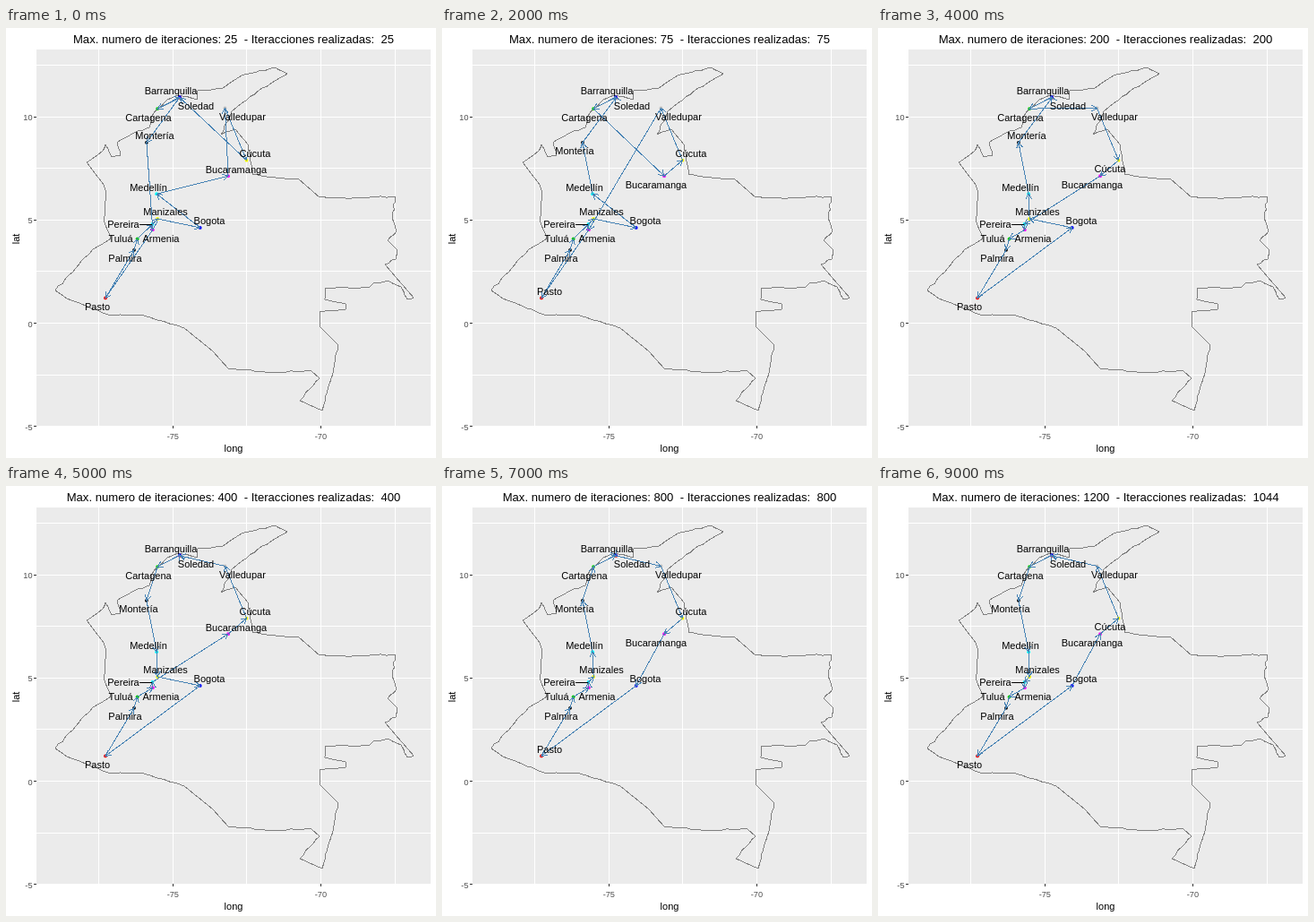
An HTML page for the animation above (10000 ms loop, 480 px wide and 480 px high).

```html
<!DOCTYPE html>
<html lang="es">
<head>
<meta charset="utf-8">
<title>Ruta</title>
<style>
html, body { margin: 0; width: 100%; height: 100%; overflow: hidden; background: #fff; }
svg { display: block; width: 100vw; height: 100vh; }
text { font: 11px "Liberation Sans", Arial, sans-serif; text-anchor: middle; white-space: pre; }
.axis text { font-size: 9.2px; fill: #4d4d4d; }
.crisp { shape-rendering: crispEdges; fill: none; }
#title { font-size: 13.1px; }
</style>
</head>
<body>
<svg id="stage" viewBox="0 0 480 480">
  <rect width="480" height="480" fill="#fff"/>
  <rect x="34" y="24" width="440" height="420" fill="#ebebeb"/>
  <path id="grid" class="crisp" stroke="#fff"/>
  <path id="ticks" class="crisp" stroke="#333"/>
  <path id="land" class="crisp" stroke="#7f7f7f"/>
  <g id="axis" class="axis"></g>
  <text x="254" y="473">long</text>
  <text transform="translate(15 235.5) rotate(-90)">lat</text>
  <g id="dots"></g>
  <path id="route" class="crisp" stroke="#4682b4"/>
  <path class="crisp" stroke="#000" d="M149 219.5H163"/>
  <g id="names"></g>
  <text id="title" x="254" y="17"></text>
</svg>
<script>
const $ = id => document.getElementById(id);
const px = lon => 186.3 + (lon + 75) * 33.03;
const py = lat => 329.5 - lat * 23.02;

function add(parent, tag, attrs, text = '') {
  const el = document.createElementNS('http://www.w3.org/2000/svg', tag);
  for (const k in attrs) el.setAttribute(k, attrs[k]);
  el.textContent = text;
  return parent.appendChild(el);
}

function drawAxes() {
  let grid = '', ticks = '';
  for (let lat = -5; lat <= 12.5; lat += 2.5) grid += `M34 ${py(lat)}H474`;
  for (let lon = -77.5; lon <= -67.5; lon += 2.5) grid += `M${px(lon)} 24V444`;
  for (let lat = -5; lat <= 10; lat += 5) {
    ticks += `M31 ${py(lat)}H34`;
    add($('axis'), 'text', { x: 29.5, y: py(lat) + 4, style: 'text-anchor:end' }, lat);
  }
  for (let lon = -75; lon <= -70; lon += 5) {
    ticks += `M${px(lon)} 444V447`;
    add($('axis'), 'text', { x: px(lon), y: 459 }, lon);
  }
  $('grid').setAttribute('d', grid);
  $('ticks').setAttribute('d', ticks);
}

// Key points of the outline, clockwise from the south-west corner
const outline = `55,293 78,268 87,257 97,247 117,235 109,214 111,200 112,184 109,175 90,150
  107,138 111,130 118,144 128,142 124,128 147,115 160,111 163,98 180,80 194,75 213,80 214,70
  241,68 263,53 300,44 314,51 286,67 252,93 240,119 256,113 270,130 276,164 327,169 350,189
  386,190 435,188 431,212 436,227 426,237 437,248 435,258 423,264 455,301 448,303 441,289
  426,282 410,285 405,290 357,290 356,303 379,308 379,314 350,317 350,333 371,354 363,391
  353,427 328,416 350,391 341,383 295,384 248,380 231,361 199,335 151,320 117,321 68,302`;

// Joins the key points with short, slightly rough steps
function drawLand() {
  let seed = 7;
  const random = () => (seed = seed * 16807 % 2147483647) / 2147483647;
  const points = outline.split(/\s+/).map(p => p.split(',').map(Number));
  const path = points.flatMap(([x1, y1], i) => {
    const [x2, y2] = points[(i + 1) % points.length];
    const count = Math.ceil(Math.hypot(x2 - x1, y2 - y1) / 6);
    return Array.from({ length: count }, (_, n) => {
      const rough = n ? 1.6 * (random() - .5) : 0;
      return `${x1 + (x2 - x1) * n / count + rough} ${y1 + (y2 - y1) * n / count + rough}`;
    });
  });
  $('land').setAttribute('d', `M${path.join('L')}Z`);
}

// key: name, longitude, latitude, label offset in px, label row (-1 above, 1 below)
const cities = {
  L: ['Palmira', -76.31, 3.55, -10, 1],
  O: ['Pasto', -77.28, 1.22, -9, 1],
  T: ['Tuluá', -76.2, 4.09, -18.5, -.12],
  K: ['Bogota', -74.08, 4.63, 10, -1],
  D: ['Medellín', -75.55, 6.27, -9, -1],
  G: ['Bucaramanga', -73.13, 7.14, 9, -1],
  U: ['Cúcuta', -72.51, 7.9, 9.5, -1],
  V: ['Valledupar', -73.24, 10.43, 20, 1],
  M: ['Montería', -75.89, 8.76, 9, -1],
  S: ['Soledad', -74.76, 10.93, 18, 1],
  C: ['Cartagena', -75.52, 10.4, -10, 1],
  B: ['Barranquilla', -74.77, 10.96, -9.5, -1],
  P: ['Pereira', -75.69, 4.8, -33, -.12],
  A: ['Armenia', -75.68, 4.53, 9, 1],
  Z: ['Manizales', -75.52, 5.06, 9, -1]
};
const palette = ['#000', '#f00', '#00cd00', '#00f', '#0ff', '#f0f', '#ff0', '#bebebe'];

const places = {};
Object.entries(cities).forEach(([key, [name, lon, lat, dx, row]], i) => {
  const x = px(lon), y = py(lat);
  add($('dots'), 'circle', { cx: x, cy: y, r: 1.9, fill: palette[i % palette.length] });
  places[key] = { x, y, dx, row, label: add($('names'), 'text', {}, name) };
});

// limit, iterations done, closed tour, labels flipped to the opposite corner
const steps = [
  [25, 25, 'ZKDGVUSCBMAOLTP', ''],
  [50, 50, 'ZKDMSBCGUVAOLTP', 'G'],
  [75, 75, 'ZKDMSBCGUVAOLTP', 'MGO'],
  [100, 100, 'OKZDMSBCGUVPATL', 'O'],
  [200, 200, 'OKZDMSBCVUGPATL', 'GU'],
  [400, 400, 'OLTAPGUVSBCMDZK', 'M'],
  [600, 600, 'OLTAPZDMCBSVUGK', 'MG'],
  [800, 800, 'OLTAPZDMCBSVUGK', 'MGO'],
  [1000, 1000, 'OKGUVSBCMDZPATL', 'MGU'],
  [1200, 1044, 'OKGUVSBCMDZPATL', 'MGU']
];

function arrow(from, to) {
  const dir = Math.atan2(from.y - to.y, from.x - to.x);
  const barb = turn => `${to.x + 7 * Math.cos(dir + turn)} ${to.y + 7 * Math.sin(dir + turn)}`;
  const tip = `${to.x} ${to.y}`;
  return `M${from.x} ${from.y}L${tip}M${barb(.52)}L${tip}L${barb(-.52)}`;
}

function draw(i) {
  const [limit, done, tour, flipped] = steps[i];
  $('title').textContent =
    `Max. numero de iteraciones: ${limit}  - Iteracciones realizadas:  ${done}`;
  $('route').setAttribute('d',
    [...tour].map((k, n) => arrow(places[k], places[tour[(n + 1) % tour.length]])).join(''));
  for (const key in places) {
    const { x, y, dx, row, label } = places[key];
    const side = flipped.includes(key) ? -1 : 1;
    label.setAttribute('x', Math.round(x + side * dx));
    label.setAttribute('y', Math.round(y + 5 + side * row * 8.6));
  }
}

drawAxes();
drawLand();
const start = performance.now();
let shown = -1;
function tick() {
  const i = Math.floor((performance.now() - start) / 1000) % steps.length;
  if (i !== shown) draw(shown = i);
  requestAnimationFrame(tick);
}
tick();
</script>
</body>
</html>
```
